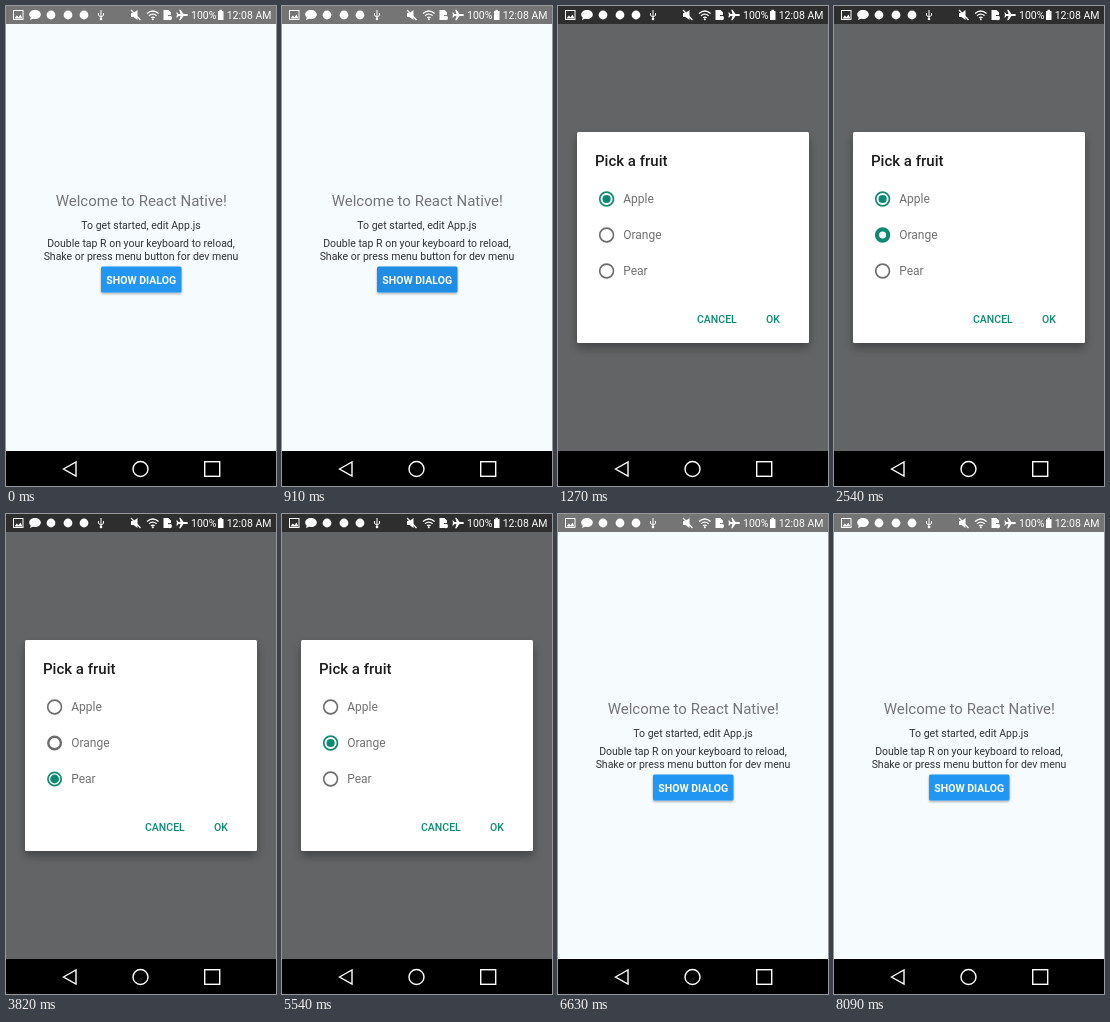
Write an HTML page that moves like this. It is 270 px wide and 480 px high and loops after 8.18 s.

```html
<!DOCTYPE html>
<html lang="en">
<head>
<meta charset="utf-8">
<title>Fruit dialog</title>
<style>
  html, body { margin: 0; width: 100%; height: 100%; overflow: hidden; background: #000; }
  svg { display: block; width: 100%; height: 100%; }
  text { font-family: Roboto, "Noto Sans", sans-serif; font-size: 10.5px; }
  .middle { text-anchor: middle; }
  .line { fill: none; stroke: #fff; stroke-width: 1.4; }
  .action { fill: #0c8b72; font-weight: 500; }
  .option { fill: #727272; font-size: 12px; }
</style>
</head>
<body>
<svg viewBox="0 0 270 480">
  <defs>
    <filter id="low" x="-10%" y="-20%" width="120%" height="160%">
      <feDropShadow dx="0" dy="1.2" stdDeviation="1.1" flood-opacity=".35"/>
    </filter>
    <filter id="high" x="-15%" y="-15%" width="130%" height="135%">
      <feDropShadow dx="0" dy="5" stdDeviation="5" flood-opacity=".32"/>
    </filter>
  </defs>

  <rect width="270" height="480" fill="#f6fbfe"/>
  <g class="middle" fill="#303234">
    <text x="135.3" y="200" fill="#757575" style="font-size:15px">Welcome to React Native!</text>
    <text x="135" y="223">To get started, edit App.js</text>
    <text x="135" y="241">Double tap R on your keyboard to reload,</text>
    <text x="135" y="253.5">Shake or press menu button for dev menu</text>
  </g>
  <rect x="95" y="260.5" width="80.5" height="26" rx="1.5" fill="#2196f3" filter="url(#low)"/>
  <rect id="press" x="95" y="260.5" width="80.5" height="26" rx="1.5" opacity="0"/>
  <text class="middle" x="135.2" y="277.5" fill="#fff" font-weight="700">SHOW DIALOG</text>

  <rect id="dim" width="270" height="445" opacity="0"/>

  <g id="dialog" opacity="0">
    <rect x="19" y="126" width="232" height="211" rx="1.5" fill="#fff" filter="url(#high)"/>
    <text x="37" y="160" fill="#1c1c1c" font-weight="500" style="font-size:15px">Pick a fruit</text>
    <g id="options"></g>
    <text class="action" x="139" y="317">CANCEL</text>
    <text class="action" x="208" y="317">OK</text>
  </g>

  <rect id="status" width="270" height="18" fill="#757575"/>
  <g fill="#fff">
    <rect class="line" x="7.5" y="4.5" width="9.5" height="9" style="stroke-width:1"/>
    <path d="M8.5 12.5l2.3-3 1.7 1.8 2-2.8 2 4z"/>
    <path d="M29 4c3.4 0 5.8 2 5.8 4.5S32.400 13 29 13l-2-.3-3 1.300.7-2.500C23.600 10.700 23.200 9.600 23.200 8.500 23.200 6 25.600 4 29 4z"/>
    <circle cx="45" cy="9" r="4.400"/>
    <circle cx="62" cy="9" r="4.400"/>
    <circle cx="78" cy="9" r="4.400"/>
    <path class="line" d="M95 4v9M92.500 7v2.500l2.500 1.500 2.500-1.500V7" style="stroke-width:1"/>
    <circle cx="95" cy="13" r="1.300"/>
    <path d="M125 7h2.500l4-3v10l-4-3H125z"/>
    <path class="line" d="M125 4l9.500 10" style="stroke-width:1.200"/>
    <path class="line" d="M141 7.500q5.800-5 11.600 0M143 9.800q3.800-3.200 7.600 0M145 11.800q1.800-1.400 3.600 0" style="stroke-width:1.300"/>
    <circle cx="146.800" cy="13.300" r="1"/>
    <path d="M157.500 4h5l2.500 2.500V9h-3v5h-4.500z"/>
    <circle cx="163.700" cy="12" r="2.300"/>
    <path d="M182 9q0-1-1.500-1h-3l-3-4.200h-1.300L174.500 8H172.500l-1.200-1.400h-1L171 9l-.7 2.400h1l1.200-1.400h2l-1.300 4.200h1.300l3-4.200h3q1.500 0 1.500-1z"/>
    <text x="185" y="13">100%</text>
    <path d="M212 5h1.500V3.800h2.500V5h1.500v9H212z"/>
    <text x="220.700" y="13">12:08 AM</text>
  </g>

  <rect y="445" width="270" height="35"/>
  <path class="line" d="M57.500 463L70 456v14z"/>
  <circle class="line" cx="134.500" cy="463" r="7.500"/>
  <rect class="line" x="198.700" y="455.700" width="15" height="14.600"/>
</svg>
<script>
const LOOP = 8180, FRAMES = 90;
const GREEN = '#0c8b72', GRAY = '#6c6c6c';
const $ = id => document.getElementById(id);

// Each track is a list of [frame, value], held or blended between entries.
const tracks = {
  press: [[4, 0], [5, .05], [6, .05], [7, .12], [9, .12], [11, 0]],
  dim: [[10, 0], [11, .16], [12, .35], [13, .52], [14, .6], [70, .6], [71, .44], [72, .16], [73, 0]],
  dialog: [[10, 0], [11, .3], [12, .77], [13, 1], [70, 1], [71, .41], [72, .08], [73, 0]],
  status: [[10, 117], [11, 82], [12, 50], [14, 46], [70, 46], [71, 52], [72, 90], [73, 117]]
};

// Selections: start frame, option left, option entered.
const picks = [[28, 0, 1], [39, 1, 2], [49, 2, 1]];

// Radio poses: outer radius, ring thickness, dot radius, colour.
const ON = [7.7, 1.7, 4.1, GREEN], OFF = [7.7, 1.6, 0, GRAY];
const turnOn = [[7.7, 4.2, 0, GREEN], [6.3, 5.6, 0, GREEN], [7, 1.7, 5, GREEN], [7.5, 1.7, 4.4, GREEN], ON];
const turnOff = [ON, [7.2, 1.7, 5, GREEN], [6.5, 4.8, 0, GRAY], [7.5, 2.4, 0, GRAY], OFF];

function svg(name, attrs, text = '') {
  const el = document.createElementNS('http://www.w3.org/2000/svg', name);
  setAll(el, attrs);
  el.textContent = text;
  return $('options').appendChild(el);
}

function setAll(el, attrs) {
  for (const key in attrs) el.setAttribute(key, attrs[key]);
}

const radios = ['Apple', 'Orange', 'Pear'].map((label, i) => {
  const cy = 193 + 36 * i;
  svg('text', { class: 'option', x: 65.2, y: cy + 4.3 }, label);
  return {
    ring: svg('circle', { cx: 48.6, cy, fill: 'none' }),
    dot: svg('circle', { cx: 48.6, cy })
  };
});

function valueAt(track, frame) {
  const next = track.findIndex(key => key[0] > frame);
  if (next === 0) return track[0][1];
  if (next < 0) return track.at(-1)[1];
  const [f0, v0] = track[next - 1], [f1, v1] = track[next];
  return v0 + (v1 - v0) * (frame - f0) / (f1 - f0);
}

function radioPose(index, frame) {
  let pose = index === 0 ? ON : OFF;
  for (const [start, from, to] of picks) {
    const step = Math.min(frame - start, 4);
    if (step < 0) break;
    if (index === from) pose = turnOff[step];
    if (index === to) pose = turnOn[step];
  }
  return pose;
}

function draw(frame) {
  for (const id of ['press', 'dim', 'dialog']) {
    $(id).setAttribute('opacity', valueAt(tracks[id], frame));
  }
  const shade = Math.round(valueAt(tracks.status, frame));
  $('status').setAttribute('fill', `rgb(${shade},${shade},${shade})`);

  radios.forEach(({ ring, dot }, i) => {
    const [radius, width, dotRadius, color] = radioPose(i, frame);
    setAll(ring, { r: radius - width / 2, 'stroke-width': width, stroke: color });
    setAll(dot, { r: dotRadius, fill: color });
  });
}

const begin = performance.now();
function tick() {
  const time = Math.max(0, performance.now() - begin) % LOOP;
  // The small lead absorbs rounding of frame times to 10 ms.
  draw(Math.min(FRAMES - 1, Math.floor((time + 6) * 11 / 1000)));
  requestAnimationFrame(tick);
}
tick();
</script>
</body>
</html>
```
